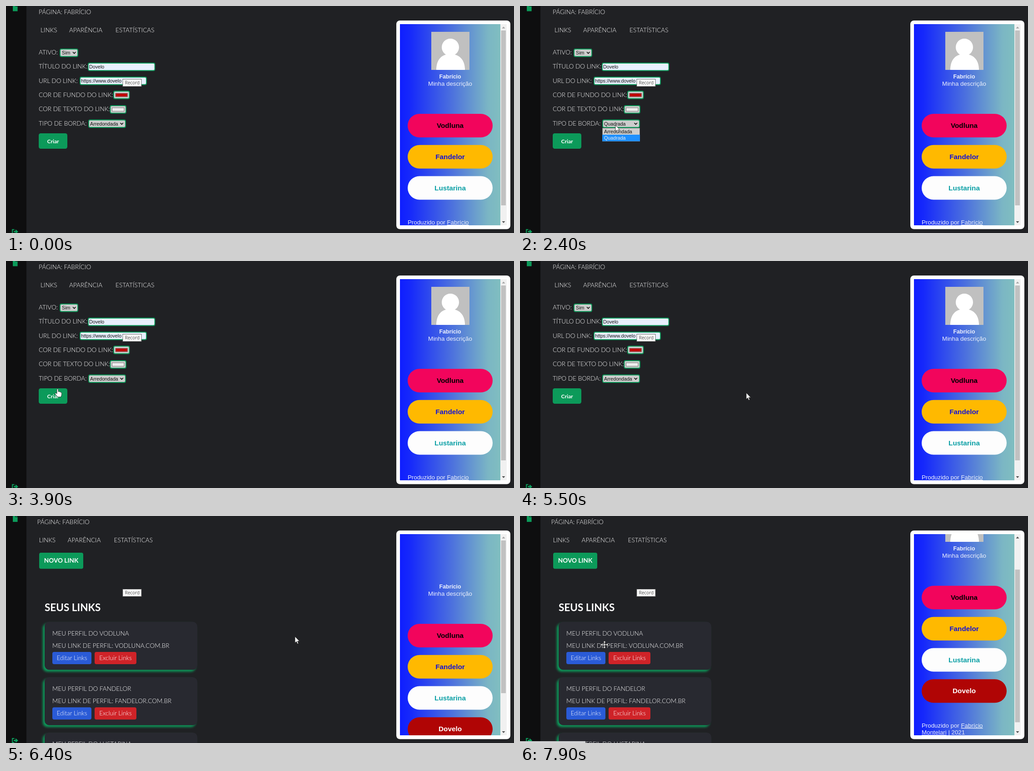
Animation, 1118 px wide and 501 px high, one loop 8 s. Source, as an HTML page:

```html
<!DOCTYPE html>
<html lang="pt-BR">
<head>
<meta charset="utf-8">
<title>Links</title>
<style>
  html, body { margin: 0; width: 100%; height: 100%; overflow: hidden; background: #202124; }
  svg { display: block; }
  text { font: 300 13.6px Lato, sans-serif; fill: #fff; white-space: pre; }
  .bold { font-weight: bold; }
  .mid { text-anchor: middle; }
  .field { font: 10.7px "Liberation Sans", Arial, sans-serif; fill: #111; }
  .page { font: 13.3px "Liberation Sans", Arial, sans-serif; fill: #eef2fc; }
  .name { font-size: 12.4px; font-weight: bold; }
  .pill { font-size: 15.3px; font-weight: bold; }
  .glow { filter: drop-shadow(-4px 4px 2.5px #0c9a5a); }
  .u { text-decoration: underline; }
</style>
</head>
<body>
<svg width="1118" height="501" viewBox="0 0 1118 501">
  <defs>
    <linearGradient id="sky">
      <stop stop-color="#0f1eff"/>
      <stop offset=".1" stop-color="#1629fb"/>
      <stop offset=".5" stop-color="#4a6edf"/>
      <stop offset=".88" stop-color="#7bb6c4"/>
      <stop offset="1" stop-color="#80bec0"/>
    </linearGradient>
    <clipPath id="view"><path d="M867 40h221v444h-221z"/></clipPath>
  </defs>
  <rect width="1118" height="501" fill="#202124"/>
  <rect width="45" height="501" fill="#0e0e0f"/>
  <path id="file" d="M15-4h5.500v5h5v10.500h-10.500zM21.500-4l4 4h-4z" fill="#0c9a5a"/>
  <g id="exit" fill="none" stroke="#0c9a5a" stroke-width="2">
    <path d="M18.500 493.500h-4.500v9h4.500"/>
    <path d="M17 496.500h4v-3.500l6 5-6 5v-3.500h-4z" fill="#0c9a5a" stroke="none"/>
  </g>
  <g id="header"></g>
  <g id="form"></g>
  <g id="list"></g>
  <g>
    <rect x="257" y="161.500" width="41" height="16" fill="#fff" stroke="#666"/>
    <text x="261.500" y="173" style="font:10px 'Open Sans',sans-serif;fill:#4a4a4a">Record</text>
  </g>
  <rect x="859" y="32" width="251" height="460.500" rx="8" fill="#fff"/>
  <g id="preview">
    <rect x="867" y="40" width="221" height="444" fill="url(#sky)"/>
    <g clip-path="url(#view)"><g id="content"></g></g>
    <rect x="1088" y="40" width="14" height="444" fill="#f1f1f1"/>
    <rect id="thumb" x="1089.500" width="10.500" fill="#c1c1c1"/>
    <path id="up" d="M1091.500 49.500l3.500-4 3.500 4z"/>
    <path d="M1091.500 475l3.500 4 3.500-4z" fill="#505050"/>
  </g>
  <rect id="status" y="497" width="144" height="4" fill="#d0d1d3"/>
  <g id="cursor" stroke="#222" stroke-width=".8" stroke-linejoin="round" fill="#fff">
    <path id="arrow" d="M0 0V14L3.200 11 5.400 16.200 7.600 15.200 5.400 10.300H9.800Z"/>
    <path id="hand" d="M0 1.500Q1.500-1 3 1.500V6.500Q5 5 6 7 8 6 8.500 8 10.500 7.500 10.500 9.500V13Q10 15 9 18H1Q0 15-4 11.500-4.500 9-2 9.500L0 11Z"/>
    <path id="move" d="M0-8.500L3-5H1V-1H5V-3L8.500 0 5 3V1H1V5H3L0 8.500-3 5H-1V1H-5V3L-8.500 0-5-3V-1H-1V-5H-3Z"/>
  </g>
</svg>
<script>
const $ = id => document.getElementById(id);
const GREEN = '#0c9a5a', GREY = '#cdcdcd';

const text = (x, y, s, cls = '', fill = '') =>
  `<text x="${x}" y="${y}" class="${cls}" style="${fill && 'fill:' + fill}">${s}</text>`;
const rect = (x, y, w, h, fill, r = 0, extra = '') =>
  `<rect x="${x}" y="${y}" width="${w}" height="${h}" fill="${fill}" rx="${r}" ${extra}/>`;
const field = (x, y, w, fill) =>
  rect(x + 1, y + 1, w - 2, 16.5, fill, 3, `stroke="${GREEN}" stroke-width="1.800"`);
const chevron = (x, y) =>
  `<path d="M${x} ${y}l3.200 3.200 3.200-3.200" fill="none" stroke="#111" stroke-width="1.700"/>`;
const swatch = (x, y, fill) => field(x, y, 36.5, GREY) +
  rect(x + 5, y + 5.7, 26.5, 7.5, fill, 0, 'stroke="#777"');
const button = (x, y, w, h, fill, label, cls = '') =>
  rect(x, y, w, h, fill, 4) + text(x + w / 2, y + h / 2 + 4.7, label, 'mid ' + cls);

$('header').innerHTML = text(72, 18, 'PÁGINA: FABRÍCIO') + text(76, 58, 'LINKS') +
  text(139, 58, 'APARÊNCIA') + text(241, 58, 'ESTATÍSTICAS');

$('form').innerHTML =
  ['ATIVO:', 'TÍTULO DO LINK:', 'URL DO LINK:', 'COR DE FUNDO DO LINK:',
   'COR DE TEXTO DO LINK:', 'TIPO DE BORDA:']
    .map((label, i) => text(72, 107 + i * 31.3, label)).join('') +
  field(118, 94, 41, GREY) + text(123, 107, 'Sim', 'field') + chevron(147, 101.5) +
  field(180, 125, 148.5, '#e8f0fe') + text(183, 138, 'Dovelo', 'field') +
  field(162, 156, 148, '#e8f0fe') + text(165, 169, 'https://www.dovelo', 'field') +
  swatch(236, 187, '#c00808') + swatch(228.5, 219, '#efefef') +
  field(181, 250.5, 83, GREY) + '<text id="chosen" x="185" y="264" class="field"/>' +
  chevron(251.5, 258) +
  rect(72, 281, 63, 34, GREEN, 4.5) +
  '<text x="103.500" y="302.500" class="mid bold" style="font-size:12px">Criar</text>' +
  '<g id="menu">' + rect(181.5, 269.5, 82, 29, GREY, 0, 'stroke="#777"') +
  '<rect id="hover" x="181" width="83" height="14.500" fill="#1e90ff"/>' +
  '<text id="round" x="185" y="281" class="field">Arredondada</text>' +
  '<text id="square" x="185" y="295" class="field">Quadrada</text></g>';

const card = (name, i) => `<g transform="translate(0 ${i * 122.2})">` +
  rect(85, 233.5, 336, 106, '#282930', 10, 'class="glow"') +
  text(102, 264, 'MEU PERFIL DO ' + name) +
  text(102, 291, `MEU LINK DE PERFIL: ${name}.COM.BR`) +
  button(102, 300, 86, 27, '#2a5bd7', 'Editar Links') +
  button(195, 300, 92, 27, '#cf2328', 'Excluir Links') + '</g>';

$('list').innerHTML = button(73, 81, 97, 35.5, GREEN, 'NOVO LINK', 'bold') +
  '<text x="85" y="210" class="bold" style="font-size:22.500px">SEUS LINKS</text>' +
  ['VODLUNA', 'FANDELOR', 'LUSTARINA'].map(card).join('');

const pill = ([name, fill, color], i) => `<g ${i == 3 ? 'id="added"' : ''}>` +
  rect(884, 238 + i * 68.75, 187, 52, fill, 26) +
  text(977.5, 269 + i * 68.75, name, 'page pill mid', color) + '</g>';

$('content').innerHTML =
  '<g id="avatar">' + rect(936, 57, 84, 84, '#c0c0c0') +
  '<circle cx="978" cy="91" r="19" fill="#fff"/>' +
  '<path d="M947 141C947 118 959 106 978 106S1010 118 1010 141Z" fill="#fff"/></g>' +
  text(977.5, 160, 'Fabrício', 'page name mid') +
  text(977.5, 176, 'Minha descrição', 'page mid') +
  [['Vodluna', '#f2055c', '#000'], ['Fandelor', '#ffb900', '#1212d8'],
   ['Lustarina', '#fdfdfd', '#0a9fa5'], ['Dovelo', '#b00505', '#fff']].map(pill).join('') +
  '<g id="footer">' +
  text(884, 482, 'Produzido por <tspan class="u">Fabrício</tspan>', 'page') +
  text(884, 497.5, '<tspan class="u">Montelari</tspan> | 2021', 'page') + '</g>';

// Pointer path: time, x, y
const path = [
  [200, 38, 1], [500, 180, 170], [700, 266, 262], [1000, 246, 276], [1200, 240, 286],
  [1300, 235, 291], [1600, 232, 291], [2000, 212, 263], [2400, 210, 263], [2600, 204, 276],
  [2700, 200, 276], [3000, 74, 287], [3100, 70, 292], [3300, 82, 316], [3500, 96, 302],
  [3700, 107, 283], [3800, 107, 283], [3900, 112, 282], [4100, 118, 308], [4300, 106, 296],
  [4500, 106, 296], [4900, 473, 270], [5200, 473, 270], [5500, 498, 291], [5700, 498, 291],
  [5800, 471, 290], [6100, 471, 290], [6400, 636, 266], [6800, 966, 274],
  [7500, 966, 274], [7600, 900, 276], [7900, 186, 284]
];

function pointerAt(t) {
  const i = path.findIndex(p => p[0] >= t);
  if (i < 1) return path[0].slice(1);
  const [t0, x0, y0] = path[i - 1], [t1, x1, y1] = path[i];
  const k = (t - t0) / (t1 - t0);
  return [x0 + (x1 - x0) * k, y0 + (y1 - y0) * k];
}

const show = (id, on) => $(id).style.display = on ? '' : 'none';
const shift = (id, x, y) => $(id).setAttribute('transform', `translate(${x} ${y})`);
const set = (id, name, value) => $(id).setAttribute(name, value);

function draw(now) {
  const t = Math.floor(now % 8000 / 100) * 100;
  const saved = t >= 5800;
  const [x, y] = pointerAt(t);

  show('form', !saved);
  show('list', saved);
  shift('header', saved ? -3.5 : 0, 0);
  shift('file', 0, saved ? 1.5 : 0);
  shift('exit', 0, saved ? -2.5 : 0);

  const second = t >= 1500 && t < 2700;
  const lower = y > 284 || second && t < 2600;
  $('chosen').textContent = second ? 'Quadrada' : 'Arredondada';
  show('menu', t >= 800 && t < 1500 || t >= 2200 && t < 2700);
  set('hover', 'y', lower ? 284 : 269.5);
  $('round').style.fill = lower ? '#111' : '#eee';
  $('square').style.fill = lower ? '#eee' : '#111';

  const scroll = 84 * Math.sin(Math.PI / 2 * Math.min(1, Math.max(0, (t - 6900) / 300)));
  show('preview', !saved || t >= 6200);
  show('avatar', !saved || t >= 6500);
  show('added', saved);
  shift('footer', 0, saved ? 68.75 : 0);
  shift('content', 0, -scroll);
  set('thumb', 'y', 54 + scroll * .765);
  set('thumb', 'height', saved ? 337 : 386);
  set('up', 'fill', scroll ? '#505050' : '#a3a3a3');
  show('status', t >= 7000);

  const inside = (l, top, r, b) => x >= l && x <= r && y >= top && y <= b;
  const hand = saved ? inside(884, 238, 1071, 290) : inside(72, 281, 135, 315);
  const move = saved && inside(85, 233, 421, 340);
  show('cursor', t >= 200);
  show('hand', hand);
  show('move', move);
  show('arrow', !hand && !move);
  shift('cursor', x, y);
}

function tick() {
  draw(performance.now());
  requestAnimationFrame(tick);
}
tick();
</script>
</body>
</html>
```
